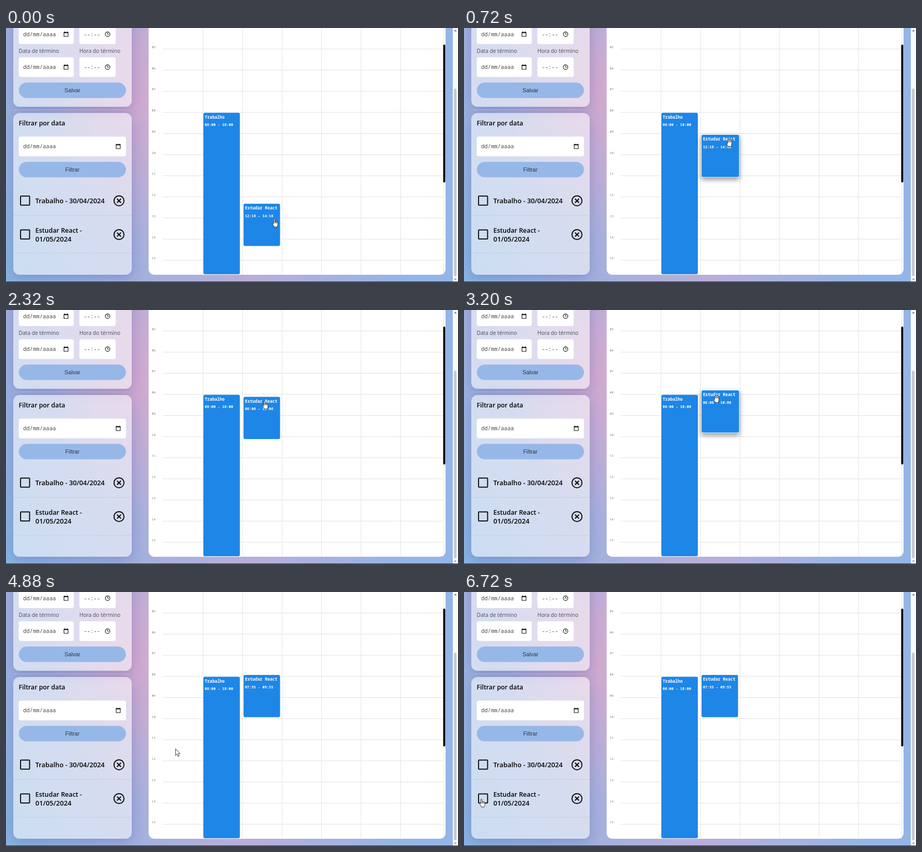
Recreate the animation shown at these times as an HTML page. Size 870 by 490 pixels, loop 6.8 s.

```html
<!DOCTYPE html>
<html lang="pt">
<head>
<meta charset="utf-8">
<style>
html, body { margin: 0; width: 100%; height: 100%; overflow: hidden; }
#stage { position: relative; width: 870px; height: 490px; overflow: hidden;
  background:
    radial-gradient(ellipse 170px 260px at 258px 135px, rgba(216,168,204,.75), rgba(216,168,204,0)),
    linear-gradient(62deg, #88b4e2 0%, #b9aeda 42%, #94b5e7 68%); }
.card { position: absolute; box-sizing: border-box; border-radius: 12px;
  background: rgba(255,255,255,.56); box-shadow: 0 6px 24px rgba(31,38,135,.22); }
svg { position: absolute; left: 0; top: 0; }
.mono { font-family: "Noto Sans Mono", "DejaVu Sans Mono", monospace; }
.sans { font-family: "Open Sans", "Noto Sans", sans-serif; }
.arial { font-family: "Liberation Sans", Arial, sans-serif; }
</style>
</head>
<body>
<div id="stage">
  <div class="card" style="left:14px;top:-60px;width:228px;height:212px"></div>
  <div class="card" style="left:14px;top:164px;width:228px;height:312px"></div>
  <svg id="svg" width="870" height="490" viewBox="0 0 870 490"></svg>
</div>
<script>
const LOOP = 6800, STEP = 80;
const BLUE = '#1e86e6';
const svg = document.getElementById('svg');

function add(tag, attrs, parent = svg, text) {
  const el = document.createElementNS('http://www.w3.org/2000/svg', tag);
  for (const k in attrs) el.setAttribute(k, attrs[k]);
  if (text !== undefined) el.textContent = text;
  parent.appendChild(el);
  return el;
}
const rect = (x, y, width, height, rx, fill, more = {}, parent) =>
  add('rect', { x, y, width, height, rx, fill, ...more }, parent);
const path = (d, more = {}, parent) =>
  add('path', { d, fill: 'none', stroke: '#111', ...more }, parent);
const label = (x, y, text, family, size, more = {}, parent) =>
  add('text', { x, y, class: family, 'font-size': size, fill: '#111', ...more }, parent, text);

function calendarIcon(x, y) {
  path(`M${x + .6} ${y + 1.4}h7.8v7.8h-7.8z`, { 'stroke-width': 1.1 });
  path(`M${x} ${y + 2}h9M${x + 2} ${y}v2M${x + 7} ${y}v2`, { 'stroke-width': 1.6 });
}
function clockIcon(cx, cy) {
  add('circle', { cx, cy, r: 4.4, fill: 'none', stroke: '#111', 'stroke-width': 1.1 });
  path(`M${cx} ${cy - 2.8}V${cy}H${cx + 2.4}`);
}
function input(x, y, w, text) {
  rect(x, y, w, 38, 4, '#fff');
  label(x + 8.5, y + 22.7, text, 'mono', 10.5, { fill: '#484848' });
}
function dateInput(y, w) {
  input(24.5, y, w, 'dd/mm/aaaa');
  calendarIcon(24.5 + w - 19.5, y + 14);
}
function timeInput(y) {
  input(141.2, y, 70, '--:--');
  clockIcon(195.5, y + 19);
}
function button(y, text) {
  rect(25, y, 205.5, 29, 14.5, '#96b8e8', { stroke: '#9fb7e6' });
  label(127.8, y + 18.2, text, 'arial', 10.8, { 'text-anchor': 'middle', fill: '#2f3642' });
}
function task(cy, ...lines) {
  rect(28, cy - 9, 17.4, 17.4, 1, 'none', { stroke: '#111', 'stroke-width': 2 });
  add('circle', { cx: 217.5, cy, r: 9.6, fill: 'none', stroke: '#111', 'stroke-width': 2 });
  path(`M213.7 ${cy - 3.8}l7.6 7.6m0 -7.6l-7.6 7.6`, { 'stroke-width': 2.2 });
  lines.forEach(([text, size], i) =>
    label(56.5, cy + 4.5 + (i - (lines.length - 1) / 2) * 17, text, 'sans', size, { 'font-weight': 600, fill: '#000' }));
}
function calendarEvent(height, title, hours) {
  const g = add('g', {});
  const box = rect(0, 0, 70.3, height, 3, BLUE, { stroke: '#fff', 'paint-order': 'stroke', 'stroke-width': 2 }, g);
  const bold = { 'font-weight': 700, fill: '#fff' };
  label(2.7, 11.3, title, 'mono', 8, bold, g);
  const time = label(2.7, 25.8, hours, 'mono', 7, { ...bold, 'font-weight': 600 }, g);
  return { g, box, time };
}

// Sidebar
dateInput(-7, 106);
timeInput(-7);
label(24.5, 48.3, 'Data de término', 'sans', 10.2, { fill: '#484a58' });
label(141.2, 48.3, 'Hora do término', 'sans', 10.2, { fill: '#484a58' });
dateInput(56.5, 106);
timeInput(56.5);
button(105.7, 'Salvar');
path('M14 158H242', { stroke: '#c3b2bd' });
label(24.5, 188.2, 'Filtrar por data', 'sans', 12.3, { 'font-weight': 600, fill: '#000' });
dateInput(209.5, 206.5);
button(258.7, 'Filtrar');
task(333.3, ['Trabalho - 30/04/2024', 12.8]);
task(398.5, ['Estudar React -', 12.4], ['01/05/2024', 13]);
path('M14 361.5H242M14 434.5H242', { stroke: '#8090b0', 'stroke-opacity': .18 });

// Calendar grid
rect(274.5, -20, 571.5, 496, 11, '#fff');
for (let i = 0; i < 11; i++) {
  const y = 40.5 + i * 40.75;
  path(`M302 ${y}H841`, { stroke: '#e0e0e0' });
  label(280.6, y - 1.6, String(i + 5).padStart(2, '0'), 'mono', 6, { fill: '#777' });
}
for (let x = 379; x < 800; x += 76) path(`M${x + .3} 0V475`, { stroke: '#e4e4e4' });
path('M842.5 0V475', { stroke: '#e6e6e6' });
rect(841.5, 32, 4, 266, 2, '#000');

// Page scrollbar
rect(860, 0, 10, 490, 0, '#fafafa');
rect(862.3, 117, 4.8, 362, 2.4, '#c4c6cf');
path('M862.5 6.5L865 3l2.5 3.5z', { fill: '#777', stroke: 'none' });
path('M862.5 483.5L865 486.5l2.5 -3z', { fill: '#888', stroke: 'none' });
rect(0, 489, 870, 1, 0, '#30343c');

const work = calendarEvent(311.7, 'Trabalho', '08:00 - 18:00');
work.g.setAttribute('transform', 'translate(379.8 163.4)');
const study = calendarEvent(81.5, 'Estudar React', '');

// Cursors
const outline = { fill: '#fff', stroke: '#222', 'stroke-width': .9, 'stroke-linejoin': 'round' };
const cursors = {
  point: path('M-2.7 1.5V-6.6a1.2 1.2 0 0 1 2.4 0V-2.2a1 1 0 0 1 1.9 .3a1 1 0 0 1 1.9 .4a.9 .9 0 0 1 1.7 .6V3.2c0 2-1.2 2.6-1.2 4.8H-1.6C-1.8 5.6-5 3.4-5 .6c0-1.1 1.4-1.1 2.3 .9ZM-.3 -2.2V.8M1.6 -1.9V.8M3.5 -1.4V.8', outline),
  grab: path('M-3.4 .8V-4.6a1 1 0 0 1 2 -.1V-6a1 1 0 0 1 2 0v.4a1 1 0 0 1 2 0v1.6a.9 .9 0 0 1 1.8 0V3c0 2-1 2.6-1 4.6H-2c-.4-2-3.4-3.6-3.4-5.6 0-1.2 1.2-1.2 2 -.2ZM-1.4 -4.7V-.5M.6 -5.6V-.5M2.6 -4V-.5', outline),
  arrow: path('M-4 -8V5l3 -2.8 2 4.8 2 -.9 -2 -4.6h4z', outline),
  beam: path('M-2 -5.5Q0 -5.5 0 -4.5Q0 -5.5 2 -5.5M0 -4.5V4.5M-2 5.5Q0 5.5 0 4.5Q0 5.5 2 5.5', { stroke: '#555', 'stroke-width': .9 })
};

// [time, x, y]
const pointerKeys = [
  [0, 518, 376], [200, 514, 354], [720, 511, 221], [1120, 506, 188], [1440, 504, 182],
  [2000, 503, 183], [2640, 495, 183], [3200, 486, 171], [3520, 488, 176],
  [4160, 508, 229.5], [4560, 470, 262], [5280, 135, 378], [5680, 115, 388],
  [6240, 60, 404], [6720, 35, 407]
];
// [time, top]
const eventKeys = [
  [0, 339], [200, 339], [720, 206], [1120, 173.5], [1440, 167.5],
  [2640, 167.5], [3200, 155], [3520, 160]
];

function sample(keys, t, column) {
  const i = keys.findIndex(k => k[0] > t);
  if (i < 0) return keys[keys.length - 1][column];
  const a = keys[i - 1], b = keys[i];
  const p = (t - a[0]) / (b[0] - a[0]);
  return a[column] + (b[column] - a[column]) * p * p * (3 - 2 * p);
}

function cursorKind(x, y, top, dragging) {
  const inside = (l, t, r, b) => x > l && x < r && y > t && y < b;
  if (dragging) return 'grab';
  if (inside(457, top, 528, top + 83) || inside(380, 163, 450, 475) || inside(25, 388, 48, 409)) return 'point';
  return inside(56, 380, 150, 415) ? 'beam' : 'arrow';
}

function draw(t) {
  const x = sample(pointerKeys, t, 1), y = sample(pointerKeys, t, 2);
  const top = sample(eventKeys, t, 1);
  const dragging = (t > 200 && t < 1600) || (t > 2640 && t < 3600);
  study.g.setAttribute('transform', `translate(457.2 ${top})`);
  study.box.setAttribute('width', dragging ? 72.3 : 70.3);
  study.box.style.filter = dragging ? 'drop-shadow(0 4px 5px rgba(0,0,0,.42))' : 'none';
  study.time.textContent = t < 1600 ? '12:18 - 14:18' : t < 3600 ? '08:06 - 10:06' : '07:55 - 09:55';
  const kind = cursorKind(x, y, top, dragging);
  for (const name in cursors) {
    cursors[name].setAttribute('display', name === kind ? 'inline' : 'none');
    cursors[name].setAttribute('transform', `translate(${x} ${y})`);
  }
}

const start = performance.now();
function tick() {
  const t = (performance.now() - start) % LOOP;
  draw(Math.floor(t / STEP) * STEP);
  requestAnimationFrame(tick);
}
draw(0);
requestAnimationFrame(tick);
</script>
</body>
</html>
```
